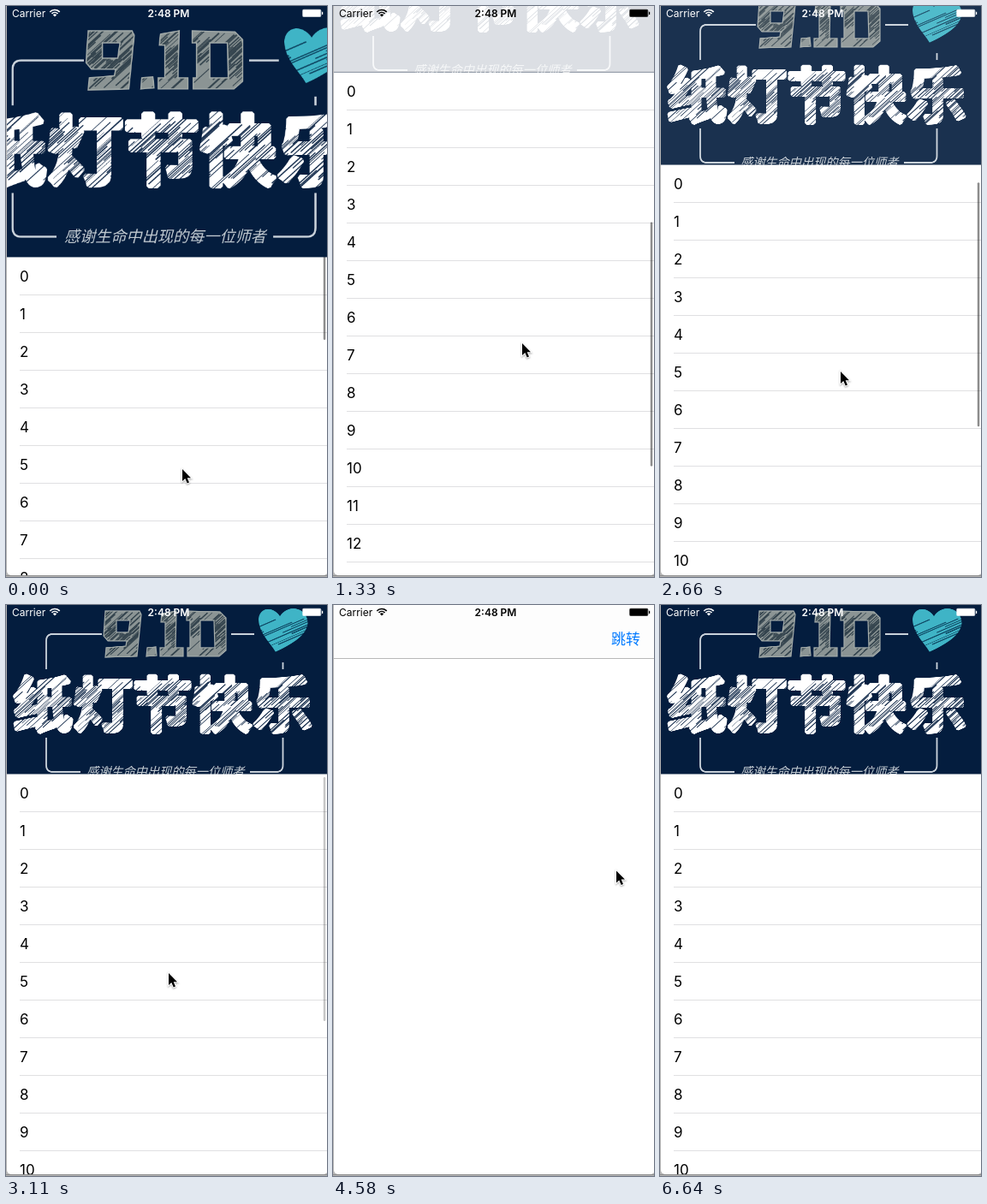
Animation, 375 px wide and 667 px high, one loop 6.74 s. Source, as an HTML page with a canvas:

```html
<!DOCTYPE html>
<html lang="zh">
<head>
<meta charset="utf-8">
<title>Stretchy header</title>
<style>
  html, body { margin: 0; width: 100%; height: 100%; overflow: hidden; background: #fff; }
  canvas { display: block; width: 375px; height: 667px; }
</style>
</head>
<body>
<canvas id="stage"></canvas>
<script>
const LOOP = 6740, STEP = 147.5;
const WIDTH = 375, HEIGHT = 667;
const HEADER = 198, ROW = 44;
const BANNER_H = 229.4, BANNER_TOP = HEADER / 2 - BANNER_H / 2;
const NAVY = '#041d3e';
const LATIN = 'Inter, sans-serif';
const HAN = '"Noto Sans CJK SC", "Noto Sans CJK", sans-serif';

// Keyframes: [step, value, ...]
const SCROLL = [[0, -96], [5, 9], [9, 120], [11, 130], [13, 128], [18, 12], [20, 0]];
const SLIDE = [[24, 0], [25, 30], [26, 81], [27, 185], [28, 300], [29, 375],
               [36, 375], [37, 109], [38, 22], [39, 0]];
const POINTER = [[0, 206, 541], [5, 215, 492], [9, 221, 394], [12, 219, 372], [18, 211, 427],
                 [21, 190, 430], [24, 38, 390], [26, 118, 381], [29, 330, 378], [30, 330, 378],
                 [35, 335, 40], [38, 335, 40], [42, 328, 75]];

const stage = document.getElementById('stage');
const ctx = stage.getContext('2d');
const ratio = window.devicePixelRatio || 1;
stage.width = WIDTH * ratio;
stage.height = HEIGHT * ratio;

const clamp = (v, lo = 0, hi = 1) => Math.min(hi, Math.max(lo, v));

function sample(keys, step) {
  const next = keys.findIndex(key => key[0] > step);
  if (next === 0) return keys[0].slice(1);
  if (next < 0) return keys[keys.length - 1].slice(1);
  const a = keys[next - 1], b = keys[next];
  const p = (step - a[0]) / (b[0] - a[0]);
  return a.slice(1).map((v, i) => v + (b[i + 1] - v) * p);
}

function seeded(seed) {
  return () => (seed = (seed * 16807) % 2147483647) / 2147483647;
}

function rect(c, color, x, y, w, h) {
  c.fillStyle = color;
  c.fillRect(x, y, w, h);
}

function label(c, text, x, y, font, color, align = 'left') {
  c.font = font;
  c.fillStyle = color;
  c.textAlign = align;
  c.fillText(text, x, y);
}

// ---- Chalkboard banner, prepared once at double size ----

function bannerLayer() {
  const layer = document.createElement('canvas');
  layer.width = WIDTH * 2;
  layer.height = Math.round(BANNER_H * 2);
  const c = layer.getContext('2d');
  c.scale(2, 2);
  c.translate(0, -BANNER_TOP);
  return c;
}

// Fills a shape and scratches diagonal strokes into it; run is the stroke's width per height.
function chalk(target, { paint, outline, scratch, gap, weight, run = 1.1, box, seed }) {
  const c = bannerLayer(), random = seeded(seed);
  const [left, top, right, bottom] = box, h = bottom - top;
  paint(c);
  c.globalCompositeOperation = 'source-atop';
  c.strokeStyle = scratch;
  for (let x = left - h * run; x < right; x += gap * (0.6 + 0.8 * random())) {
    const from = random() * 0.6, to = from + 0.2 + random() * 0.4;
    c.lineWidth = weight * (0.5 + random());
    c.beginPath();
    c.moveTo(x + h * from * run, bottom - h * from);
    c.lineTo(x + h * to * run, bottom - h * to);
    c.stroke();
  }
  c.globalCompositeOperation = 'source-over';
  if (outline) outline(c);
  target.drawImage(c.canvas, 0, BANNER_TOP, WIDTH, BANNER_H);
}

function makeBanner() {
  const c = bannerLayer();
  rect(c, NAVY, 0, BANNER_TOP, WIDTH, BANNER_H);

  c.strokeStyle = '#ccd4dc';
  c.lineWidth = 1.8;
  c.stroke(new Path2D(`M112 34H55Q47 34 47 42V75 M47 155V187Q47 195 55 195H87
    M263 34H290 M323.5 67V75 M323.5 155V187Q323.5 195 315.5 195H285`));

  const date = new Path2D(`M116 7H156L158 11L153 60L116 61L117 50L140 48L141 42L119 42L114 36Z
    M129 18H145L143 32H129Z M165 50L175 49L176 59L164 60Z
    M182 10L199 7L198 50H207V60H180V50H186V20H181Z
    M211 7L250 8L257 15V53L249 60H212V50H215V18H211Z M227 18H243L244 50H227Z`);
  chalk(c, {
    seed: 11, box: [110, 4, 260, 64], gap: 1.6, weight: 1.1, scratch: '#34444e',
    paint(l) { l.fillStyle = '#8b9494'; l.fill(date, 'evenodd'); },
    outline(l) { l.strokeStyle = '#a3aba9'; l.lineWidth = 1.2; l.stroke(date); }
  });

  const title = '纸灯节快乐', titleFont = `900 70px ${HAN}`;
  chalk(c, {
    seed: 29, box: [5, 78, 362, 155], gap: 2.3, weight: 0.85, scratch: '#1a3150',
    paint(l) {
      label(l, title, 8, 142.5, titleFont, '#fff');
      l.strokeStyle = '#fff';
      l.lineWidth = 4;
      l.lineJoin = 'bevel';
      l.strokeText(title, 8, 142.5);
    }
  });

  const heart = new Path2D(`M320 13C312 1 296 2 295 17C296 34 309 44 315 55
    C330 47 350 38 352.5 22C353 4 331 -3 320 13Z`);
  chalk(c, {
    seed: 5, box: [292, 0, 356, 58], gap: 6, weight: 1.1, run: 2.3, scratch: '#0f4a66',
    paint(l) { l.fillStyle = '#3fb4c6'; l.fill(heart); }
  });

  label(c, '感谢生命中出现的每一位师者', 94, 200, `italic 500 14.2px ${HAN}`, '#c3cbd2');
  return c.canvas;
}

const banner = makeBanner();

// ---- Screens ----

function drawHeader(scroll) {
  const height = HEADER - 0.5 - scroll;
  const scale = Math.max(1, height / BANNER_H);
  const middle = scroll < 0 ? height / 2 : HEADER / 2 - scroll;
  const veil = clamp(scroll / 140);
  ctx.save();
  ctx.beginPath();
  ctx.rect(1, 0, WIDTH, height);
  ctx.clip();
  ctx.drawImage(banner, WIDTH / 2 * (1 - scale), middle - BANNER_H * scale / 2,
                WIDTH * scale, BANNER_H * scale);
  rect(ctx, `rgba(255,255,255,${veil})`, 0, 0, WIDTH, height);
  rect(ctx, `rgba(0,0,0,${veil * 0.18})`, 0, height - 1, WIDTH, 1);
  ctx.restore();
}

function drawList(scroll, barAlpha) {
  rect(ctx, '#fff', 1, 0, WIDTH, HEIGHT);
  const top = Math.round(HEADER - scroll);
  for (let i = 0, y = top; y < HEIGHT; i++, y += ROW) {
    label(ctx, i, 16, y + 28, `17px ${LATIN}`, '#000');
    rect(ctx, '#e0e0e2', 16, y + ROW - 1, WIDTH, 1);
  }
  if (barAlpha > 0) {
    const y = 201 + Math.max(0, scroll) * 0.43;
    const length = 285 + Math.min(0, scroll);
    ctx.fillStyle = `rgba(0,0,0,${0.45 * barAlpha})`;
    ctx.beginPath();
    ctx.roundRect(370.8, y, 2.5, length, 1.2);
    ctx.fill();
  }
  drawHeader(scroll);
}

function drawHome(slide, popping) {
  const dim = 0.09 * (1 - slide / WIDTH);
  rect(ctx, '#fff', 0, 0, WIDTH, HEIGHT);
  rect(ctx, `rgba(0,0,0,${dim})`, 0, 0, WIDTH, HEIGHT);
  if (popping) {
    rect(ctx, '#fdfdfd', 0, 0, WIDTH, 62);
    rect(ctx, '#b8b8b8', 0, 62, WIDTH, 1);
    label(ctx, '跳转', 342 + slide - WIDTH, 46, `17px ${HAN}`, '#007aff', 'center');
  }
  if (slide === WIDTH) return;
  const edge = slide + 1, shade = ctx.createLinearGradient(edge - 9, 0, edge, 0);
  shade.addColorStop(0, 'rgba(0,0,0,0)');
  shade.addColorStop(1, `rgba(0,0,0,${popping ? 0.2 : 0.06})`);
  rect(ctx, shade, edge - 9, 0, 9, HEIGHT);
}

function drawStatus(color) {
  label(ctx, 'Carrier', 7, 12.5, `12px ${LATIN}`, color);
  label(ctx, '2:48 PM', 190, 12.5, `600 12px ${LATIN}`, color, 'center');
  ctx.strokeStyle = color;
  ctx.lineWidth = 1.7;
  for (const radius of [4.8, 7.8]) {
    ctx.beginPath();
    ctx.arc(57, 12.3, radius, -Math.PI * 0.76, -Math.PI * 0.24);
    ctx.stroke();
  }
  ctx.beginPath();
  ctx.moveTo(57, 12.6);
  ctx.arc(57, 12.3, 2.8, -Math.PI * 0.76, -Math.PI * 0.24);
  ctx.fill();
  ctx.globalAlpha = 0.65;
  ctx.beginPath();
  ctx.roundRect(346, 3.7, 22.4, 9.4, 2);
  ctx.fill();
  ctx.globalAlpha = 1;
  rect(ctx, color, 347, 4.5, 20.4, 7.8);
  rect(ctx, color, 369, 6.8, 1.2, 3.2);
}

const arrow = new Path2D('M0 0V14L3.3 11L5.7 16.5L8 15.5L5.7 10.2H10Z');

function drawPointer(x, y) {
  ctx.save();
  ctx.translate(x, y);
  ctx.shadowColor = 'rgba(0,0,0,.35)';
  ctx.shadowBlur = 2 * ratio;
  ctx.shadowOffsetY = ratio;
  ctx.strokeStyle = '#fff';
  ctx.lineWidth = 2;
  ctx.stroke(arrow);
  ctx.shadowColor = 'transparent';
  ctx.fillStyle = '#000';
  ctx.fill(arrow);
  ctx.restore();
}

function render(time) {
  const step = Math.floor((time % LOOP + 6) / STEP);
  const [scroll] = sample(SCROLL, step);
  const [slide] = sample(SLIDE, step);
  const popping = step >= 25 && step <= 36;

  ctx.setTransform(ratio, 0, 0, ratio, 0, 0);
  rect(ctx, '#b4b4b4', 0, 0, WIDTH, HEIGHT);
  rect(ctx, '#8c8c8c', 0, 665, WIDTH, 1);
  ctx.save();
  ctx.beginPath();
  ctx.roundRect(1, -10, WIDTH, 675, [0, 0, 5, 5]);
  ctx.clip();
  if (slide > 0) drawHome(slide, popping);
  ctx.save();
  ctx.translate(slide, 0);
  drawList(scroll, clamp((22 - step) / 2));
  ctx.restore();
  drawStatus(popping || scroll > 70 ? '#000' : '#fff');
  if (step < 45) drawPointer(...sample(POINTER, step));
  ctx.restore();
}

function tick() {
  render(performance.now());
  requestAnimationFrame(tick);
}
tick();
</script>
</body>
</html>
```
